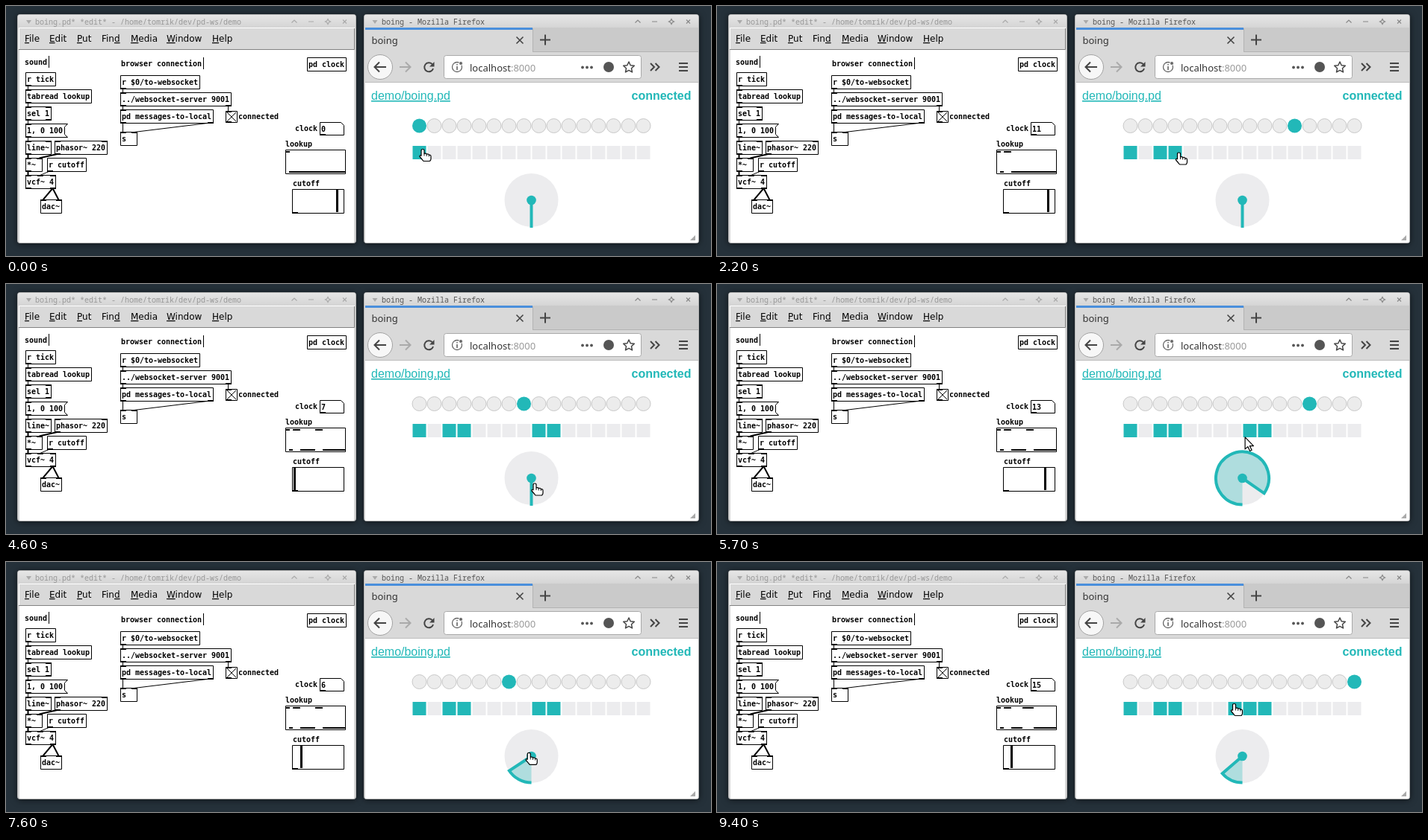
An HTML page that plays this animation: 944x336 px, repeating every 9.5 s.

```html
<!DOCTYPE html>
<html lang="en">
<head>
<meta charset="utf-8">
<title>boing</title>
<style>
  html, body { margin: 0; width: 100%; height: 100%; overflow: hidden; background: #25313a; }
  svg { display: block; width: 944px; height: 336px; }
  text { white-space: pre; }
  .frame { fill: #d8d8d8; stroke: #b4b4b4; filter: drop-shadow(0 1px 4px rgba(0, 0, 0, .6)); }
  .title { font: 10px "Noto Sans Mono", monospace; }
  .menu { font: 12px "DejaVu Sans", sans-serif; }
  .pd text { font: bold 10px "DejaVu Sans Mono", monospace; letter-spacing: -.02px; }
  .pd .box { fill: #fff; stroke: #000; }
  .wire { fill: none; stroke: #000; }
  .ui { font: 13px "Noto Sans", sans-serif; fill: #333; }
  .page { font: 16px "Liberation Sans", Arial, sans-serif; fill: #22b8b8; }
  .status { font-weight: bold; }
  .icon { fill: none; stroke: #444; stroke-width: 2; }
  .dot { fill: #ececec; stroke: #c8c8c8; }
  .cell { fill: #ececee; }
  .dot.on { fill: #22b8b8; stroke: none; }
  .cell.on { fill: #22b8b8; }
  .cursor { fill: #fff; stroke: #000; stroke-width: 1.2; stroke-linejoin: round; }
</style>
</head>
<body>
<svg viewBox="0 0 944 336">
  <defs>
    <linearGradient id="bar" x2="0" y2="1">
      <stop stop-color="#e6e6e6"/><stop offset="1" stop-color="#d4d4d4"/>
    </linearGradient>
    <path id="controls" fill="none" stroke-width="1.2"
      d="M-3.500 1.500L0-2 3.500 1.500M19 0h7M45-3.500l1.200 2.300 2.300 1.200-2.300 1.200-1.200 2.300-1.200-2.300-2.300-1.200 2.300-1.200zM65-2.500l5 5M70-2.500l-5 5"/>
  </defs>
  <rect width="944" height="336" fill="#25313a"/>

  <!-- patch window -->
  <rect class="frame" x="15.500" y="11.500" width="453" height="307" rx="3"/>
  <rect x="16" y="12" width="452" height="17" rx="2" fill="url(#bar)"/>
  <path d="M27 19h7l-3.500 5z" fill="#aaa"/>
  <text class="title" x="39" y="24.500" fill="#989898">boing.pd* *edit* - /home/tomrik/dev/pd-ws/demo</text>
  <use href="#controls" x="386" y="21" stroke="#aaa"/>
  <rect x="17" y="29" width="450" height="30" fill="#d9d9d9"/>
  <path d="M17.500 58V29.500H467" fill="none" stroke="#fff"/>
  <path d="M17 58.500H466.500V30" fill="none" stroke="#828282"/>
  <g class="menu" id="menu"></g>
  <rect x="18" y="59" width="448" height="259" fill="#fff"/>
  <g class="pd" id="patch"></g>

  <!-- browser window -->
  <rect class="frame" x="479.500" y="11.500" width="448" height="307" rx="3"/>
  <rect x="480" y="12" width="447" height="18" rx="2" fill="url(#bar)"/>
  <path d="M490.500 19h7l-3.500 5z" fill="#aaa"/>
  <text class="title" x="503" y="24.500" fill="#555">boing - Mozilla Firefox</text>
  <use href="#controls" x="846" y="21" stroke="#888"/>
  <rect x="481" y="29" width="446" height="33" fill="#cacaca"/>
  <rect x="481" y="62" width="446" height="41" fill="#d9d9d9"/>
  <path d="M705 61.500H927M705.500 30V62" stroke="#b2b2b2"/>
  <rect x="481" y="29" width="224" height="33" fill="#d9d9d9"/>
  <rect x="481" y="29" width="224" height="3" fill="#4a8fdc"/>
  <text class="ui" x="489.500" y="51">boing</text>
  <g class="icon">
    <path d="M683.500 41.500l9 9M692.500 41.500l-9 9" stroke-width="1.600"/>
    <path d="M715 45.500h14M722 38.500v14"/>
    <circle cx="501" cy="82" r="16.500" fill="#f7f7f7" stroke="#a3a3a3" stroke-width="1"/>
    <path d="M509 82H494M500 75.500l-6.500 6.500 6.500 6.500"/>
    <path d="M527 82H541M535 75.500l6.500 6.500-6.500 6.500" stroke="#aaa"/>
    <path d="M570.500 78A6 6 0 1 0 572 84"/>
    <path d="M573.500 75v6.500h-6.500z" fill="#444" stroke="none"/>
    <rect x="586.500" y="66.500" width="264" height="31" rx="3" fill="#fff" stroke="#a9a9a9" stroke-width="1"/>
    <circle cx="604" cy="82" r="6.500" stroke="#666" stroke-width="1.300"/>
    <path d="M604 81v5M604 78v1.500" stroke="#666" stroke-width="1.600"/>
    <circle cx="609" cy="77" r="2.500" fill="#666" stroke="#fff" stroke-width="1"/>
    <path d="M834 75l2.200 4.700 5.100.6-3.800 3.500 1 5.100-4.500-2.500-4.500 2.500 1-5.100-3.800-3.500 5.100-.6z" stroke-width="1.500" stroke-linejoin="round"/>
    <path d="M863 77l5 5-5 5M869.500 77l5 5-5 5"/>
    <path d="M901 77h12M901 82h12M901 87h12"/>
  </g>
  <g fill="#555">
    <circle cx="772" cy="82.500" r="1.900"/><circle cx="778" cy="82.500" r="1.900"/><circle cx="784" cy="82.500" r="1.900"/>
    <circle cx="807" cy="82" r="7"/>
  </g>
  <text class="ui" x="621" y="87.500">localhost<tspan fill="#999">:8000</tspan></text>
  <path d="M481 102.500H927" stroke="#bcbcbc"/>
  <rect x="481" y="103" width="446" height="215" fill="#fff"/>
  <text class="page" x="489" y="126" text-decoration="underline">demo/boing.pd</text>
  <text class="page status" x="837.500" y="126">connected</text>
  <path d="M923 308v7h-7z" fill="#aaa"/>
  <g id="dots"></g>
  <g id="cells"></g>
  <circle cx="703.500" cy="261" r="36" fill="#ececee"/>
  <path id="dial" fill="#22b8b8" fill-opacity=".3" stroke="#22b8b8" stroke-width="4"/>
  <circle cx="703.500" cy="261" r="6.300" fill="#22b8b8"/>
  <g class="cursor" id="cursor">
    <g id="hand">
      <path d="M-2 2Q-2 0 0 0T2 2V6Q4.500 4.800 5.200 6.800 7.600 5.800 8.300 7.800 11 7.200 11 10V13Q11 14.500 9.500 16H1Q-1 13.500-4 10Q-4.500 7.500-2 8.800Z"/>
      <path d="M2 6v3M5.200 7v2.500M8.300 8v2" fill="none" stroke-width=".9"/>
    </g>
    <path id="arrow" d="M0 0V16L3.700 12.700 6.500 18.500 9 17.300 6.300 11.700H11.300Z"/>
  </g>
</svg>
<script>
const LOOP = 9500, FRAME = 100, STEP = 200, N = 16, TAU = Math.PI * 2;
const NS = 'http://www.w3.org/2000/svg';
const $ = id => document.getElementById(id);
const patch = $('patch');

function add(parent, tag, attrs, text) {
  const el = document.createElementNS(NS, tag);
  for (const key in attrs) el.setAttribute(key, attrs[key]);
  if (text !== undefined) el.textContent = text;
  return parent.appendChild(el);
}
const label = (x, y, text) => add(patch, 'text', { x, y }, text);
const line = (d, width = 1) => add(patch, 'path', { d, class: 'wire', 'stroke-width': width });
const outline = d => add(patch, 'path', { d, class: 'box' });

// left edge of port i out of count
const portX = (x, w, i, count) => x + (count > 1 ? Math.floor((w - 7) * i / (count - 1)) : 0);

function ports(x, y, w, count) {
  for (let i = 0; i < count; i++)
    add(patch, 'rect', { x: portX(x, w, i, count), y, width: 8, height: 2 });
}
function box(x, y, text, ins, outs, flag = 0) {
  const w = Math.max(22, 6 * text.length + 4 + flag), h = 18;
  outline(`M${x + .5} ${y + .5}h${w}l${-flag} ${flag}v${h - 2 * flag}l${flag} ${flag}h${-w}z`);
  ports(x, y, w, ins);
  ports(x, y + h - 1, w, outs);
  label(x + 2, y + 13, text);
  return { x, y, w, h, ins, outs };
}
function wire(a, out, b, inlet, width) {
  const x0 = portX(a.x, a.w, out, a.outs) + 3.5, x1 = portX(b.x, b.w, inlet, b.ins) + 3.5;
  line(`M${x0} ${a.y + a.h}L${x1} ${b.y + .5}`, width);
}

[['File', 25], ['Edit', 58], ['Put', 95], ['Find', 128, 3], ['Media', 167], ['Window', 215], ['Help', 276]]
  .forEach(([name, x, key = 0]) => {
    const el = add($('menu'), 'text', { x, y: 48 });
    add(el, 'tspan', {}, name.slice(0, key));
    add(el, 'tspan', { 'text-decoration': 'underline' }, name[key]);
    add(el, 'tspan', {}, name.slice(key + 1));
  });

// patch
label(25, 79, 'sound');
label(154, 81, 'browser connection');
line('M57.500 67v16M264.500 69v16');
const rTick = box(26, 89, 'r tick', 0, 1);
const tabread = box(26, 112, 'tabread lookup', 1, 1);
const sel = box(26, 135, 'sel 1', 2, 2);
const message = box(26, 158, '1, 0 100', 1, 1, 4);
const ramp = box(26, 181, 'line~', 2, 1);
const phasor = box(65, 181, 'phasor~ 220', 2, 1);
const times = box(26, 204, '*~', 2, 1);
const rCutoff = box(55, 204, 'r cutoff', 0, 1);
const vcf = box(26, 227, 'vcf~ 4', 3, 2);
const dac = box(46, 260, 'dac~', 2, 0);
const rSocket = box(153, 93, 'r $0/to-websocket', 0, 1);
const server = box(153, 116, '../websocket-server 9001', 1, 2);
const local = box(153, 139, 'pd messages-to-local', 1, 2);
const send = box(153, 169, 's', 2, 0);
box(403, 69, 'pd clock', 0, 0);

const toggle = { x: 294, y: 141, w: 15, ins: 1 };
outline('M294.500 141.500h15v15h-15z');
line('M296 143l12 12M308 143l-12 12');
ports(294, 141, 15, 1);
ports(294, 155, 15, 1);
label(311, 152, 'connected');

wire(rTick, 0, tabread, 0);
wire(tabread, 0, sel, 0);
wire(sel, 0, message, 0);
wire(message, 0, ramp, 0);
wire(ramp, 0, times, 0, 2);
wire(phasor, 0, times, 1, 2);
wire(times, 0, vcf, 0, 2);
wire(rCutoff, 0, vcf, 1);
wire(vcf, 1, dac, 0, 2);
wire(vcf, 1, dac, 1, 2);
wire(rSocket, 0, server, 0);
wire(server, 0, local, 0);
wire(server, 1, toggle, 0);
wire(local, 0, send, 0);
wire(local, 1, send, 1);

label(387, 168, 'clock');
outline('M420.500 156.500h28l4 4v13h-32z');
ports(420, 172, 32, 1);
const clock = label(422, 169, '0');
label(374, 189, 'lookup');
outline('M374.500 193.500h80v32h-80z');
const table = line('', 2);
label(384, 242, 'cutoff');
outline('M383.500 246.500h69v32h-69z');
ports(383, 277, 69, 1);
const slider = add(patch, 'rect', { y: 247, width: 3, height: 30 });

const dots = [], cells = [];
for (let i = 0; i < N; i++) {
  dots.push(add($('dots'), 'circle', { class: 'dot', cx: 553.5 + 20 * i, cy: 161, r: 9.5 }));
  cells.push(add($('cells'), 'rect', { class: 'cell', x: 544.5 + 20 * i, y: 188, width: 18, height: 18 }));
}

// cell index -> time it is switched on
const clicks = { 0: 0, 2: 1500, 3: 1900, 8: 2900, 9: 3500, 7: 9200 };
// pointer path: time, x, y
const path = [
  [0, 558, 192.5], [700, 558, 193], [1300, 593.5, 197], [1600, 594, 197],
  [1900, 613, 197], [2100, 613, 197], [2800, 712, 197], [2900, 714, 197], [3200, 723.5, 197],
  [3400, 732, 197], [3700, 732, 198], [4400, 708, 268], [4800, 708, 268],
  [5900, 707, 200], [6200, 707, 200], [6800, 707, 213], [7700, 700, 258],
  [7900, 699, 258], [8400, 676.5, 232], [9100, 692.5, 190.5], [LOOP, 692.5, 190.5]
];
const grab = 4400, release = 7700;

function pointer(t) {
  const i = path.findIndex(p => p[0] > t);
  const [t0, x0, y0] = path[i - 1], [t1, x1, y1] = path[i];
  const u = (t - t0) / (t1 - t0), e = u * u * (3 - 2 * u);
  return [x0 + (x1 - x0) * e, y0 + (y1 - y0) * e];
}

// the knob follows the vertical drag
function knob(t) {
  if (t < grab) return 0;
  const y = pointer(Math.min(t, release))[1];
  return Math.min(1, Math.max(0, (268 - y) / 73.3));
}

function dialPath(v) {
  const r = 35.5, a = v * TAU, x = 703.5 - r * Math.sin(a), y = 261 + r * Math.cos(a);
  if (v < .002) return 'M703.500 261V298';
  return `M703.500 ${261 + r}A${r} ${r} 0 ${v > .5 ? 1 : 0} 1 ${x} ${y}L703.500 261`;
}

function draw(t) {
  const beat = Math.floor(t / STEP) % N;
  clock.textContent = Math.floor((t + FRAME) / STEP) % N;
  let d = '';
  for (let i = 0; i < N; i++) {
    const on = t >= clicks[i];
    dots[i].classList.toggle('on', i === beat);
    cells[i].classList.toggle('on', on);
    d += `M${375 + 5 * i - (i > 0)} ${on ? 196 : 223}h5`;
  }
  table.setAttribute('d', d);

  const v = knob(t);
  $('dial').setAttribute('d', dialPath(v));
  slider.setAttribute('x', t < grab ? 442 : Math.floor(385 + 63 * v));

  const [x, y] = pointer(t);
  const dragging = t > grab && t < release;
  const hover = (y > 224 && y < 297) || (!dragging && y > 187 && y < 207);
  $('hand').style.display = hover ? '' : 'none';
  $('arrow').style.display = hover ? 'none' : '';
  $('cursor').setAttribute('transform', `translate(${x} ${y})`);
}

const start = performance.now();
function tick() {
  const t = (performance.now() - start) % LOOP;
  draw(Math.floor(t / FRAME) * FRAME);
  requestAnimationFrame(tick);
}
tick();
</script>
</body>
</html>
```
